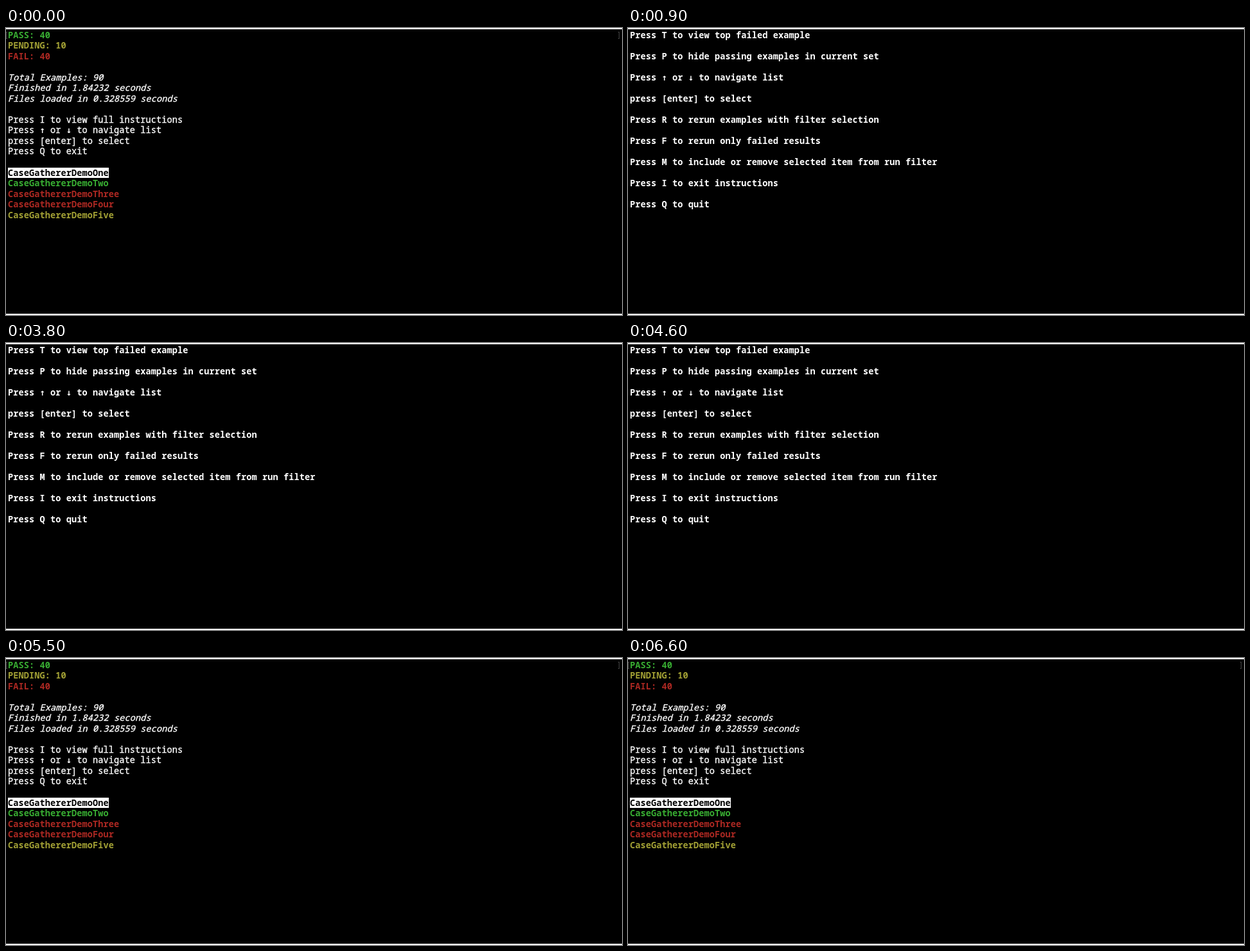
An HTML page that plays this animation: 959x448 px, repeating every 6700 ms.

```html
<!DOCTYPE html>
<html lang="en">
<head>
<meta charset="utf-8">
<title>Test list</title>
<style>
  html, body { margin: 0; width: 100%; height: 100%; overflow: hidden; background: #000; }
  body { position: relative; }
  body::before, body::after {
    content: ""; position: absolute; left: 0; right: 0; height: 2px; background: #fff;
  }
  body::before { top: 0; height: 1.6px; }
  body::after { top: 446px; }

  .screen {
    position: absolute; left: 3px; top: 2.8px;
    font: 500 13.6px/16.52px "Noto Sans Mono", "DejaVu Sans Mono", monospace;
    letter-spacing: .095px; color: #fff; white-space: pre;
  }
  p { margin: 0; height: 16.52px; }
  b { font-weight: 700; -webkit-text-stroke: 0; }
  .pass { color: #38ad32; }
  .wait { color: #a2a034; }
  .fail { color: #ac2822; }
  .picked { display: inline-block; vertical-align: top; background: #fff; color: #000; }
  .arrow { font: 700 13.6px/0 "DejaVu Sans Mono", monospace; }

  .mark { position: absolute; top: 3px; width: 1px; height: 9px; border: 1px solid #444; }
  .mark.open { left: -3px; border-right: 0; }
  .mark.close { left: 950px; border-left: 0; }

  .help { font-weight: 700; }
  .help p { height: 33.04px; }

  /* the help screen is open from 0.9 s to 5.5 s */
  .list { -webkit-text-stroke: .35px; animation: list 6.7s step-end infinite; }
  .help { animation: help 6.7s step-end infinite; }
  @keyframes list {
    0%, 82.08% { visibility: visible; }
    13.43% { visibility: hidden; }
  }
  @keyframes help {
    0%, 82.08% { visibility: hidden; }
    13.43% { visibility: visible; }
  }
</style>
</head>
<body>
<div class="screen list"><i class="mark open"></i><i class="mark close"></i><p><b class="pass">PASS: 40</b></p><p><b class="wait">PENDING: 10</b></p><p><b class="fail">FAIL: 40</b></p><p></p><p><i>Total Examples: 90</i></p><p><i>Finished in 1.84232 seconds</i></p><p><i>Files loaded in 0.328559 seconds</i></p><p></p><p>Press I to view full instructions</p><p>Press <b class="arrow">↑</b> or <b class="arrow">↓</b> to navigate list</p><p>press [enter] to select</p><p>Press Q to exit</p><p></p><p><b class="picked">CaseGathererDemoOne</b></p><p><b class="pass">CaseGathererDemoTwo</b></p><p><b class="fail">CaseGathererDemoThree</b></p><p><b class="fail">CaseGathererDemoFour</b></p><p><b class="wait">CaseGathererDemoFive</b></p></div>
<div class="screen help"><p>Press T to view top failed example</p><p>Press P to hide passing examples in current set</p><p>Press <b class="arrow">↑</b> or <b class="arrow">↓</b> to navigate list</p><p>press [enter] to select</p><p>Press R to rerun examples with filter selection</p><p>Press F to rerun only failed results</p><p>Press M to include or remove selected item from run filter</p><p>Press I to exit instructions</p><p>Press Q to quit</p></div>
</body>
</html>
```
